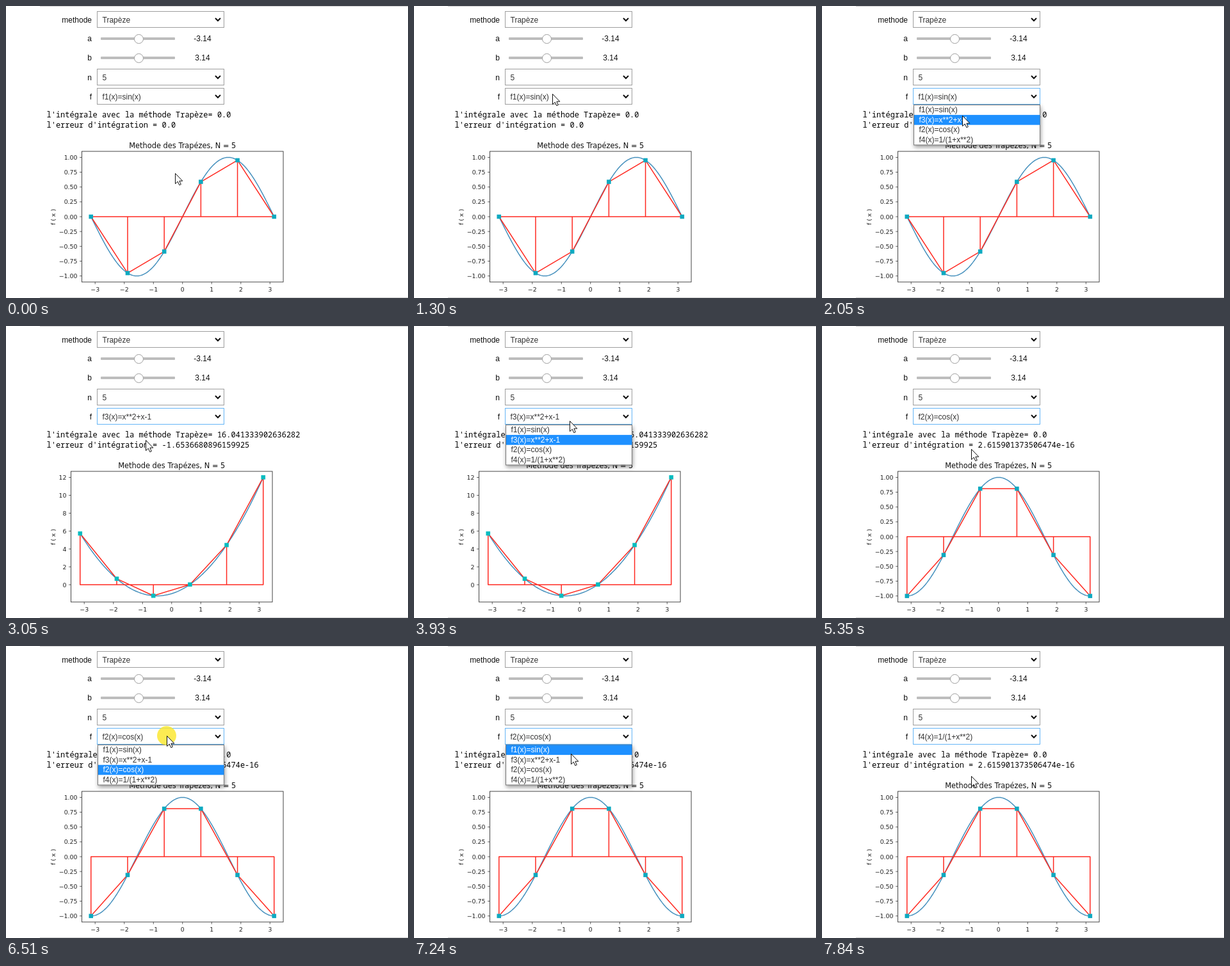
An HTML page for the animation above (7.99 s loop, 628 px wide and 456 px high).

```html
<!DOCTYPE html>
<html lang="fr">
<head>
<meta charset="utf-8">
<title>Intégration numérique</title>
<style>
html, body { margin: 0; width: 100%; height: 100%; overflow: hidden; background: #fff; }
svg { display: block; width: 628px; height: 456px; }
text { white-space: pre; }
.ui { font: 12px "Liberation Sans", Arial, sans-serif; fill: #111; }
.val { fill: #333; }
.out { font: 12px "Noto Sans Mono", "DejaVu Sans Mono", monospace; fill: #000; }
.tick { font: 9.4px "DejaVu Sans", sans-serif; fill: #222; }
.title { font: 11.4px "DejaVu Sans", sans-serif; fill: #111; }
.end { text-anchor: end; }
.mid { text-anchor: middle; }
#menu { filter: drop-shadow(1px 3px 3px rgba(0, 0, 0, .4)); }
</style>
</head>
<body>
<svg id="stage" viewBox="0 0 628 456" xmlns="http://www.w3.org/2000/svg"></svg>
<script>
const LOOP = 7990;
const STEP = 69;
const NS = 'http://www.w3.org/2000/svg';
const stage = document.getElementById('stage');

function add(parent, tag, attrs, content) {
  const el = document.createElementNS(NS, tag);
  for (const key in attrs) el.setAttribute(key, attrs[key]);
  if (content !== undefined) el.textContent = content;
  parent.appendChild(el);
  return el;
}
const label = (parent, cls, x, y, content) => add(parent, 'text', { class: cls, x, y }, content);
const show = (el, on) => el.setAttribute('visibility', on ? 'visible' : 'hidden');

// Form controls
function select(name, y, value) {
  label(stage, 'ui end', 134, y + 18, name);
  const box = add(stage, 'rect', { x: 142.5, y: y + .5, width: 198, height: 25, fill: '#fff', stroke: '#9e9e9e' });
  const text = label(stage, 'ui val', 150.5, y + 18, value);
  add(stage, 'path', { d: `M327 ${y + 11}l4 4 4-4`, fill: 'none', stroke: '#111', 'stroke-width': 2 });
  return { box, text };
}
function slider(name, y, value) {
  label(stage, 'ui end', 134, y + 4, name);
  add(stage, 'rect', { x: 148, y: y - 2, width: 116, height: 4, rx: 1, fill: '#bdbdbd' });
  add(stage, 'circle', { cx: 207.5, cy: y + .5, r: 7, fill: '#fff', stroke: '#9e9e9e' });
  label(stage, 'ui mid', 307, y + 4, value);
}

for (const y of [.5, 455.5]) add(stage, 'path', { d: `M53 ${y}H628`, stroke: '#cfcfcf' });
select('methode', 8, 'Trapèze');
slider('a', 51, '-3.14');
slider('b', 81, '3.14');
select('n', 98, '5');
const chooser = select('f', 128, '');

const lines = [174, 190].map(y => label(stage, 'out', 63.5, y, ''));

// Charts
const minus = s => String(s).replace('-', '\u2212');

function chart({ fn, left, zero, unit, ticks, digits, dot }) {
  const g = add(stage, 'g', {});
  const mid = left + 157.3;
  const px = x => mid + x * 45.53;
  const py = y => zero - y * unit;
  const pt = x => `${px(x).toFixed(2)} ${py(fn(x)).toFixed(2)}`;
  const nodes = Array.from({ length: 6 }, (_, i) => -Math.PI + i * Math.PI * .4);
  const fine = Array.from({ length: 101 }, (_, i) => -Math.PI + i * Math.PI / 50);

  add(g, 'path', { d: 'M' + fine.map(pt).join('L'), fill: 'none', stroke: '#4590bd', 'stroke-width': 1.5 });
  const traps = nodes.slice(1).map((b, i) => {
    const a = nodes[i];
    return `M${px(a)} ${zero}L${pt(a)}L${pt(b)}L${px(b)} ${zero}Z`;
  }).join('');
  add(g, 'path', { d: traps, fill: 'none', stroke: '#ff2a22', 'stroke-width': 1.5, 'stroke-linejoin': 'round' });
  for (const x of nodes)
    add(g, 'rect', { x: px(x) - 3.3, y: py(fn(x)) - 3.3, width: 6.6, height: 6.6, fill: dot });

  add(g, 'rect', { x: left, y: 227, width: 314.6, height: 204, fill: 'none', stroke: '#333', 'stroke-width': .9 });
  for (let x = -3; x <= 3; x++) {
    add(g, 'path', { d: `M${px(x)} 431v3.4`, stroke: '#333', 'stroke-width': .8 });
    label(g, 'tick mid', px(x), 445.5, minus(x));
  }
  for (const v of ticks) {
    add(g, 'path', { d: `M${left} ${py(v)}h-3.4`, stroke: '#333', 'stroke-width': .8 });
    label(g, 'tick end', left - 7, py(v) + 3.5, minus(v.toFixed(digits)));
  }
  label(g, 'title mid', mid, 221.5, 'Methode des Trapézes, N = 5');
  add(g, 'text', { class: 'tick mid', transform: 'translate(77 329.5) rotate(-90)' }, 'f ( x )');
  return g;
}

const wave = {
  left: 118.5, zero: 329, unit: 92.6, digits: 2, dot: '#0ea9c0',
  ticks: Array.from({ length: 9 }, (_, i) => i / 4 - 1)
};
const charts = [
  chart({ ...wave, fn: Math.sin }),
  chart({
    fn: x => x * x + x - 1, left: 101.5, zero: 404, unit: 13.96, digits: 0, dot: '#06bcc0',
    ticks: [0, 2, 4, 6, 8, 10, 12]
  }),
  chart({ ...wave, fn: Math.cos })
];
const results = [['0.0', '0.0'], ['16.041333902636282', '-1.6536680896159925'], ['0.0', '2.615901373506474e-16']];

// Drop-down list
const names = ['f1(x)=sin(x)', 'f3(x)=x**2+x-1', 'f2(x)=cos(x)', 'f4(x)=1/(1+x**2)'];
const ROW = 15.6;
const menu = add(stage, 'g', { id: 'menu' });
add(menu, 'rect', { x: 143.5, y: 154.5, width: 197, height: 62.5, fill: '#fff', stroke: '#777' });
const bar = add(menu, 'rect', { x: 144, width: 196.5, height: ROW, fill: '#1e90ff' });
const rows = names.map((s, i) => label(menu, 'ui', 151.5, 166 + i * 15.5, s));

// Pointer
const flash = add(stage, 'circle', { r: 15, fill: '#fbe72c', opacity: .82 });
const cursor = add(stage, 'path', {
  d: 'M.5 .5V16.6L4.3 13.2 6.8 18.7 9.3 17.6 6.9 12.2H11.8Z', fill: '#fff', stroke: '#111', 'stroke-width': 1
});

// start, end, then a quadratic curve: from, control, to
const moves = [
  [680, 1440, 377, 246, 175, 89, 222, 145],
  [1780, 2050, 222, 149, 220, 160, 218, 176],
  [2180, 2180, 218, 178, 218, 178, 218, 178],
  [3050, 3540, 218, 178, 224, 160, 243, 148],
  [3940, 4280, 243, 152, 240, 170, 233, 202],
  [4740, 4880, 233, 199, 233, 196, 233, 192],
  [5420, 6050, 234, 190, 244, 165, 251, 140],
  [6970, 7450, 250, 144, 245, 175, 233, 203]
];
const clicks = [[1510, 1580], [2370, 2500], [3740, 3870], [5080, 5210], [6510, 6640], [7710, 7840]];

function pointer(t) {
  const m = moves.filter(v => t >= v[0]).pop();
  if (!m) return [264, 261];
  const [start, end, x0, y0, cx, cy, x1, y1] = m;
  const last = Math.round((end - start) / STEP);
  const k = Math.min(last, Math.floor((t - start + 2) / STEP));
  const p = last ? k / last : 1;
  const s = p * p * (3 - 2 * p);
  const curve = (a, b, c) => Math.round((1 - s) * (1 - s) * a + 2 * s * (1 - s) * b + s * s * c);
  return [curve(x0, cx, x1), curve(y0, cy, y1)];
}

const passed = (t, times) => times.filter(v => t >= v).length;

function draw(t) {
  const [x, y] = pointer(t);
  const done = passed(t, clicks.map(c => c[0]));
  const open = done % 2 === 1;
  const chosen = done >> 1;

  chooser.text.textContent = names[chosen];
  chooser.box.setAttribute('stroke', done ? '#64b5f6' : '#9e9e9e');

  const [area, error] = results[passed(t, [2570, 5280])];
  lines[0].textContent = "l'intégrale avec la méthode Trapèze= " + area;
  lines[1].textContent = "l'erreur d'intégration = " + error;

  const cleared = (t >= 2570 && t < 2640) || (t >= 5280 && t < 5350);
  const current = passed(t, [2640, 5350]);
  charts.forEach((g, i) => show(g, i === current && !cleared));

  show(menu, open);
  const hover = y >= 155 ? Math.min(3, Math.floor((y - 154.5) / ROW)) : chosen;
  bar.setAttribute('y', 154.5 + hover * ROW);
  rows.forEach((r, i) => { r.style.fill = i === hover ? '#fff' : '#333'; });

  show(flash, clicks.some(([a, b]) => t >= a && t < b));
  flash.setAttribute('cx', x);
  flash.setAttribute('cy', y);
  show(cursor, t < 70 || t >= 680);
  cursor.setAttribute('transform', `translate(${x} ${y})`);
}

let begin;
function tick(now) {
  if (begin === undefined) begin = now;
  draw((now - begin) % LOOP);
  requestAnimationFrame(tick);
}
draw(0);
requestAnimationFrame(tick);
</script>
</body>
</html>
```
